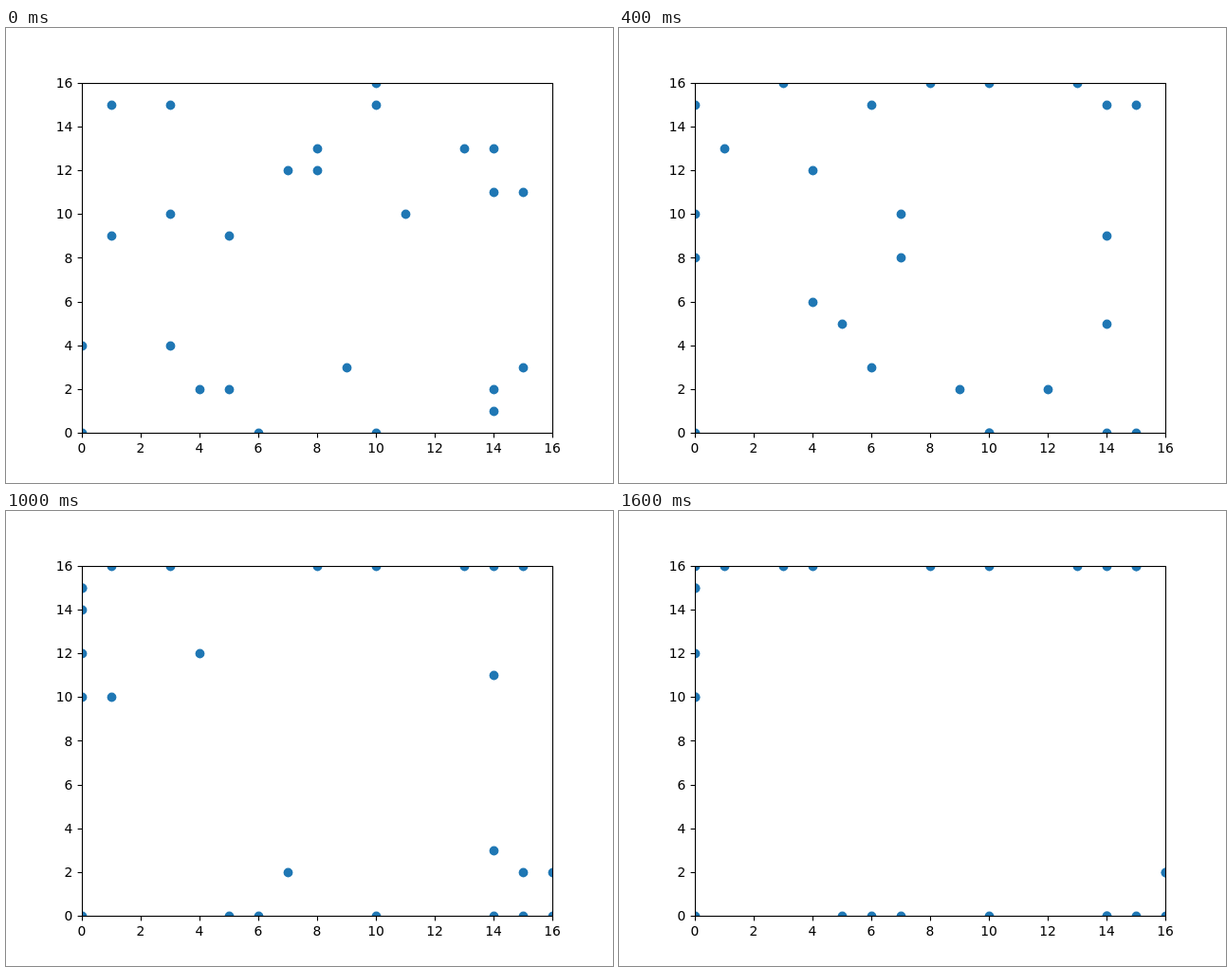
An HTML page with a canvas for the animation above (5 s loop, 640 px wide and 480 px high).

```html
<!DOCTYPE html>
<html>
<head>
<meta charset="utf-8">
<style>
html, body { margin: 0; width: 100%; height: 100%; overflow: hidden; background: #fff; }
canvas { display: block; }
</style>
</head>
<body>
<canvas id="stage" width="640" height="480"></canvas>
<script>
const ctx = document.getElementById('stage').getContext('2d');
const SIZE = 16, LOOP = 5000, STEP = 100, LAST = 16;
const DIRS = { U: [0, 1], D: [0, -1], L: [-1, 0], R: [1, 0] };

// Start x, start y, moves; the last move repeats until a wall stops it.
const walkers = [
  [1, 15, 'L'], [3, 15, 'U'], [10, 16, 'U'], [10, 15, 'L'], [8, 13, 'U'],
  [7, 12, 'D'], [8, 12, 'L'], [13, 13, 'U'], [14, 13, 'D'], [14, 11, 'U'],
  [15, 11, 'U'], [11, 10, 'L'], [3, 10, 'L'], [1, 9, 'U'], [5, 9, 'D'],
  [0, 4, 'U'], [3, 4, 'RRRD'], [4, 2, 'U'], [5, 2, 'R'], [9, 3, 'DR'],
  [15, 3, 'D'], [14, 2, 'D'], [14, 1, 'U'.repeat(13) + 'RU'],
  [0, 0, 'D'], [6, 0, 'R'], [10, 0, 'D']
];

const px = x => 80 + 31 * x;
const py = y => 427.2 - 23.1 * y;
const snap = v => Math.round(v) + 0.5;
const clamp = v => Math.max(0, Math.min(SIZE, v));

function place([x, y, moves], steps) {
  for (let i = 0; i < steps; i++) {
    const [dx, dy] = DIRS[moves[Math.min(i, moves.length - 1)]];
    x = clamp(x + dx);
    y = clamp(y + dy);
  }
  return [snap(px(x)), snap(py(y))];
}

function line(x1, y1, x2, y2) {
  ctx.beginPath();
  ctx.moveTo(x1, y1);
  ctx.lineTo(x2, y2);
  ctx.stroke();
}

function drawAxes() {
  ctx.strokeStyle = ctx.fillStyle = '#000';
  ctx.lineWidth = 1.11;
  ctx.font = '13.89px "DejaVu Sans", sans-serif';
  ctx.strokeRect(80.5, 58.5, 496, 369);
  for (let v = 0; v <= SIZE; v += 2) {
    const x = snap(px(v)), y = snap(py(v));
    line(x, 427.5, x, 432.4);
    line(75.6, y, 80.5, y);
    ctx.textAlign = 'center';
    ctx.fillText(v, px(v), 448);
    ctx.textAlign = 'right';
    ctx.fillText(v, 70.3, Math.round(py(v) + 5.28));
  }
}

function drawDots(steps) {
  ctx.save();
  ctx.beginPath();
  ctx.rect(80, 58, 496, 369);
  ctx.clip();
  ctx.fillStyle = '#1f77b4';
  for (const w of walkers) {
    ctx.beginPath();
    ctx.arc(...place(w, steps), 4.9, 0, 2 * Math.PI);
    ctx.fill();
  }
  ctx.restore();
}

function draw(now) {
  const steps = Math.min(LAST, Math.floor((now - start) % LOOP / STEP));
  ctx.fillStyle = '#fff';
  ctx.fillRect(0, 0, 640, 480);
  drawDots(steps);
  drawAxes();
}

function frame() {
  draw(performance.now());
  requestAnimationFrame(frame);
}

const start = performance.now();
frame();
</script>
</body>
</html>
```
